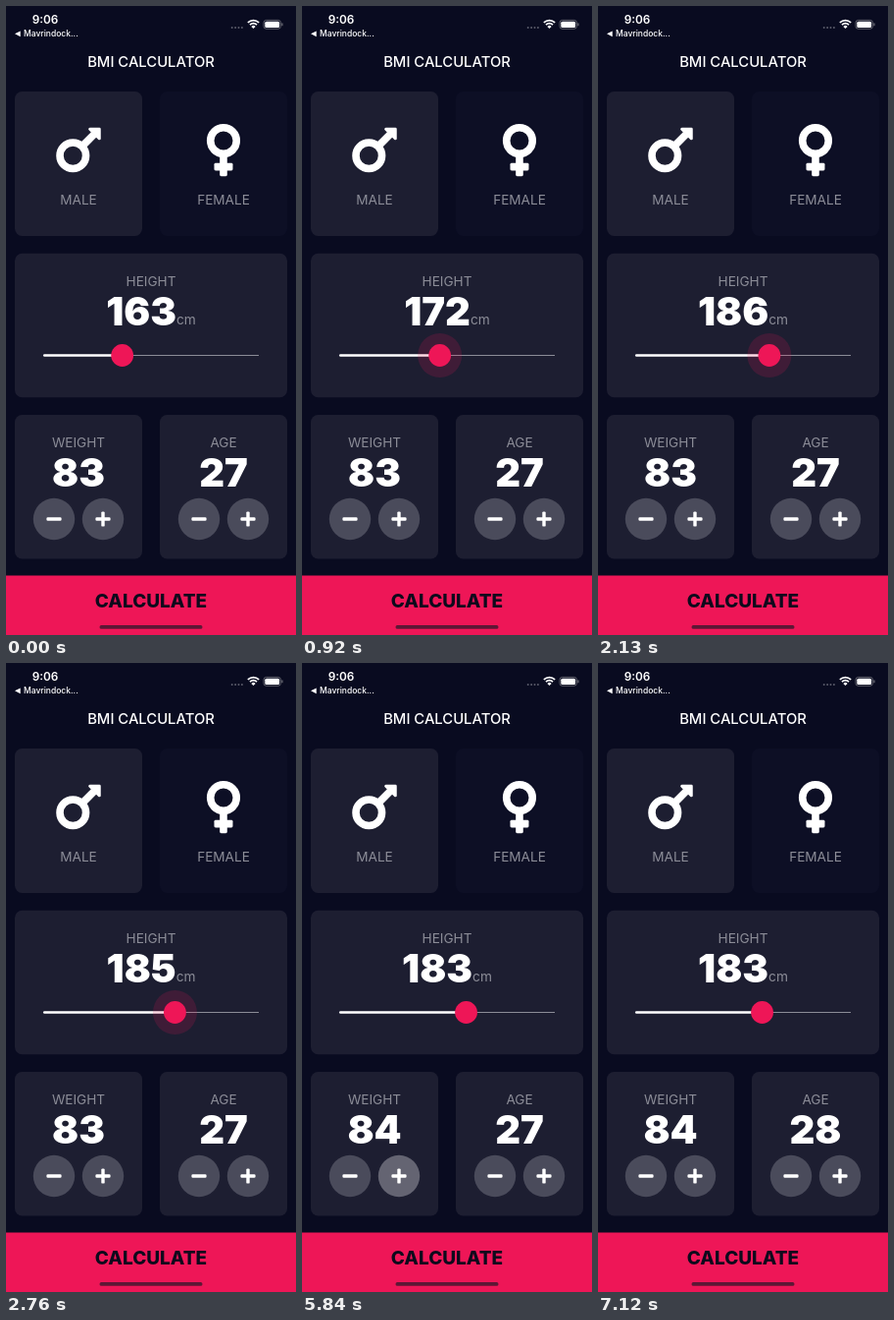
Animation of 296x640 px, one loop 8000 ms. Source, as an HTML page with a canvas:

```html
<!DOCTYPE html>
<html lang="en">
<head>
<meta charset="utf-8">
<title>BMI Calculator</title>
<style>
html, body { margin: 0; width: 100%; height: 100%; overflow: hidden; background: #090b20; }
canvas { display: block; width: 296px; height: 640px; }
</style>
</head>
<body>
<canvas id="stage"></canvas>
<script>
const W = 296, H = 640, LOOP = 8000;
const BG = '#090b20', CARD = '#1d1e31', CARD_OFF = '#0d0f25';
const PINK = '#ee1657', GREY = '#8b8c97', WHITE = '#fff';
const SANS = 'Inter, Roboto, sans-serif';

const canvas = document.getElementById('stage');
const ctx = canvas.getContext('2d');
const dpr = window.devicePixelRatio || 1;
canvas.width = W * dpr;
canvas.height = H * dpr;

// [start time, value]: each value holds until the next start
const height = [[0, 163], [810, 167], [920, 172], [1040, 175], [1150, 179], [1270, 181],
  [1500, 184], [1620, 185], [2130, 186], [2540, 187], [2650, 186], [2760, 185], [2870, 184], [2990, 183]];
const halo = [[0, 0], [500, 14], [700, 22.5], [3460, 0]];
const weight = [[0, 83], [5840, 84]];
const age = [[0, 27], [6890, 28]];
const weightPress = [[0, 0], [5840, 1], [5940, 0]];
const agePress = [[0, 0], [6890, 1], [7010, 0.5], [7120, 0]];

function at(track, t) {
  let value = track[0][1];
  for (const [start, v] of track) if (t >= start) value = v;
  return value;
}

function text(str, x, y, size, weight, color = WHITE, align = 'center') {
  ctx.font = `${weight} ${size}px ${SANS}`;
  ctx.textAlign = align;
  ctx.fillStyle = color;
  ctx.fillText(str, x, y);
}

function box(x, y, w, h, r, color) {
  ctx.fillStyle = color;
  ctx.beginPath();
  ctx.roundRect(x, y, w, h, r);
  ctx.fill();
}

function disc(x, y, r, color) {
  ctx.fillStyle = color;
  ctx.beginPath();
  ctx.arc(x, y, r, 0, Math.PI * 2);
  ctx.fill();
}

function ring(x, y, r, width) {
  ctx.lineWidth = width;
  ctx.beginPath();
  ctx.arc(x, y, r, 0, Math.PI * 2);
  ctx.stroke();
}

function polyline(points, width, fill) {
  ctx.lineWidth = width;
  ctx.beginPath();
  points.forEach(([x, y]) => ctx.lineTo(x, y));
  if (fill) {
    ctx.closePath();
    ctx.fill();
  }
  ctx.stroke();
}

// Icons are drawn in a 512-unit square
function icon(x, y, draw) {
  ctx.save();
  ctx.translate(x, y);
  ctx.scale(0.1186, 0.1186);
  ctx.fillStyle = ctx.strokeStyle = WHITE;
  ctx.lineJoin = 'round';
  draw();
  ctx.restore();
}

function male() {
  ring(144, 304, 112, 64);
  polyline([[228, 220], [326, 122]], 64);
  polyline([[290, 76], [372, 76], [372, 158]], 24, true);
}

function female() {
  ring(144, 176, 112, 64);
  box(112, 300, 64, 180, 12, WHITE);
  box(64, 368, 160, 64, 12, WHITE);
}

function statusBar() {
  text('9:06', 40, 18, 11.8, 600);
  ctx.fillStyle = WHITE;
  ctx.beginPath();
  ctx.moveTo(9, 28.3);
  ctx.lineTo(14.7, 25.4);
  ctx.lineTo(14.7, 31.2);
  ctx.fill();
  text('Mavrindock...', 18, 31.2, 8.5, 500, WHITE, 'left');

  for (let i = 0; i < 4; i++) disc(230.7 + i * 3.4, 22, 1, '#5b5c6b');

  ctx.strokeStyle = WHITE;
  ctx.lineWidth = 1.7;
  for (const r of [5, 8]) {
    ctx.beginPath();
    ctx.arc(252.5, 22.6, r, -Math.PI * 0.75, -Math.PI * 0.25);
    ctx.stroke();
  }
  ctx.fillStyle = WHITE;
  ctx.beginPath();
  ctx.moveTo(252.5, 23);
  ctx.arc(252.5, 23, 3, -Math.PI * 0.75, -Math.PI * 0.25);
  ctx.fill();

  ctx.strokeStyle = '#76777f';
  ctx.lineWidth = 0.8;
  ctx.beginPath();
  ctx.roundRect(263, 14.4, 17.4, 8.8, 2.6);
  ctx.stroke();
  box(264.3, 15.7, 14.8, 6.2, 1.5, WHITE);
  box(281.4, 17.3, 1.1, 3, 0.6, '#76777f');
}

function slider(value, haloRadius) {
  const y = 355.5, left = 38, right = 258;
  const x = left + (value - 130) / 90 * (right - left);
  box(x, y - 0.6, right - x, 1.2, 0, GREY);
  box(left, y - 1.25, x - left, 2.5, 1.2, WHITE);
  if (haloRadius) disc(x, y, haloRadius, 'rgba(238, 22, 87, 0.16)');
  disc(x, y, 11.4, PINK);
}

function heightCard(t) {
  box(9, 251.7, 278, 146.5, 7.5, CARD);
  text('HEIGHT', 148, 284.6, 13.6, 400, GREY);

  const value = at(height, t);
  ctx.font = `900 40px ${SANS}`;
  const numberWidth = ctx.measureText(value).width;
  ctx.font = `400 13.7px ${SANS}`;
  const start = 148 - (numberWidth + ctx.measureText('cm').width) / 2;
  text(value, start, 325.4, 40, 900, WHITE, 'left');
  text('cm', start + numberWidth, 323.6, 13.7, 400, GREY, 'left');
  slider(value, at(halo, t));
}

function roundButton(x, plus, press) {
  const y = 522;
  disc(x, y, 21.2, '#4a4b5b');
  if (press) disc(x, y, 21.2, `rgba(255, 255, 255, ${0.14 * press})`);
  box(x - 7.6, y - 1.7, 15.2, 3.4, 1.2, WHITE);
  if (plus) box(x - 1.7, y - 7.6, 3.4, 15.2, 1.2, WHITE);
}

function counterCard(x, label, value, press) {
  const mid = x + 65;
  box(x, 416, 130, 146.5, 7.5, CARD);
  text(label, mid, 448.8, 13.6, 400, GREY);
  text(value, mid, 489.4, 40, 900);
  roundButton(mid - 25, false, 0);
  roundButton(mid + 25, true, press);
}

function draw(t) {
  ctx.setTransform(dpr, 0, 0, dpr, 0, 0);
  ctx.fillStyle = BG;
  ctx.fillRect(0, 0, W, H);
  statusBar();
  text('BMI CALCULATOR', 148, 62.4, 14.8, 500);

  box(9, 87, 130, 147, 7.5, CARD);
  box(157, 87, 130, 147, 7.5, CARD_OFF);
  icon(51.2, 116.2, male);
  icon(204.9, 116.2, female);
  text('MALE', 74, 201.8, 13.6, 400, GREY);
  text('FEMALE', 222, 201.8, 13.6, 400, GREY);

  heightCard(t);
  counterCard(9, 'WEIGHT', at(weight, t), at(weightPress, t));
  counterCard(157, 'AGE', at(age, t), at(agePress, t));

  box(0, 579.5, W, H - 579.5, 0, PINK);
  text('CALCULATE', 148, 611.8, 19, 800, '#0d0a1c');
  box(95.5, 630, 105, 3.8, 1.9, '#5c1735');
}

const begin = performance.now();
function frame() {
  draw((performance.now() - begin) % LOOP);
  requestAnimationFrame(frame);
}
frame();
</script>
</body>
</html>
```
